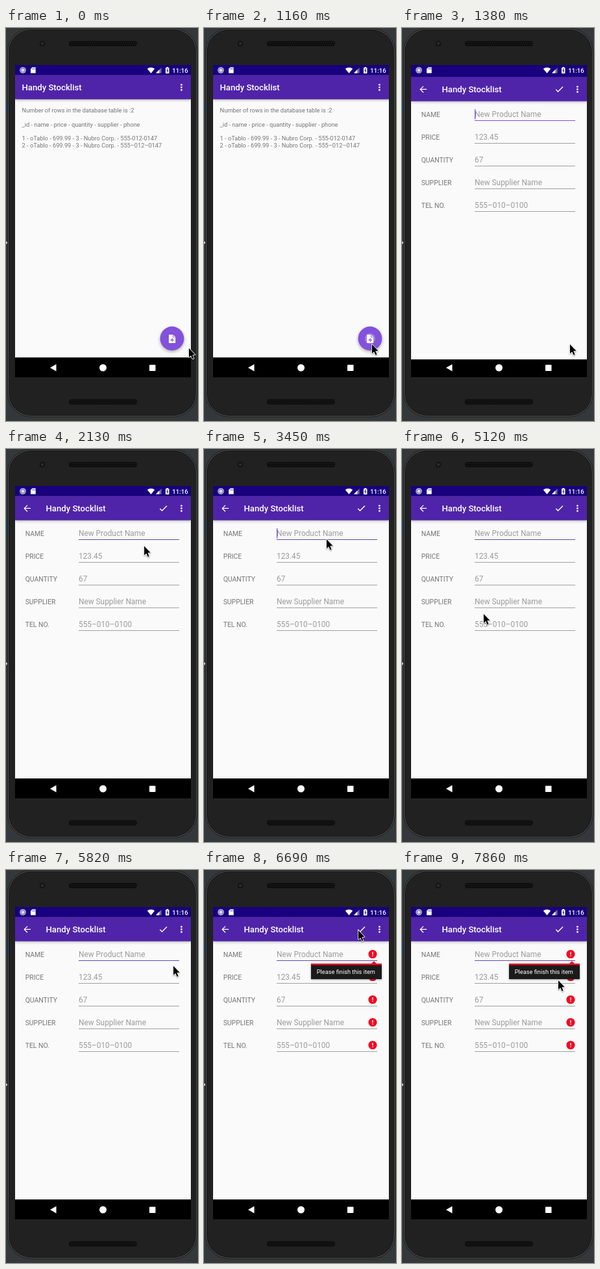
Write an HTML page with a canvas that moves like this. It is 296 px wide and 605 px high and loops after 8000 ms.

```html
<!DOCTYPE html>
<html lang="en">
<head>
<meta charset="utf-8">
<title>Inventory app</title>
<style>
html, body { margin: 0; width: 100%; height: 100%; overflow: hidden; background: #34383a; }
canvas { display: block; width: 296px; height: 605px; }
</style>
</head>
<body>
<canvas id="stage" width="296" height="605"></canvas>
<script>
const ctx = document.getElementById('stage').getContext('2d');
const LOOP = 8000;
const TITLE = 'Handy Stocklist';
const LIST = [
  'Number of rows in the database table is :2', '',
  '_id - name - price - quantity - supplier - phone', '',
  '1 - oTablo - 699.99 - 3 - Nubro Corp. - 555-012-0147',
  '2 - oTablo - 699.99 - 3 - Nubro Corp. - 555–012–0147'
];
const FIELDS = [
  ['NAME', 'New Product Name'], ['PRICE', '123.45'], ['QUANTITY', '67'],
  ['SUPPLIER', 'New Supplier Name'], ['TEL NO.', '555–010–0100']
];
const SCREEN = { x: 14, y: 57, w: 271, h: 481.8 };
const DP = SCREEN.w / 411.4;
const ROW = 35;
const STATUS = '#18007e', BAR = '#5024a9', ACCENT = '#8351db', RED = '#f20a22';
const OPEN_AT = 1235, CARET_AT = 1295, CARET_HALF = 481, ERROR_AT = 6570;

// Each gesture passes its points at even intervals and rests until the next one.
const GESTURES = [
  { from: 0, to: 690, via: [[282, 493], [262, 511], [217, 470], [238, 440], [259, 487]] },
  { from: 1640, to: 3450, via: [[259, 487], [243, 330], [217, 163], [196, 140], [178, 205],
    [150, 274], [165, 232], [182, 175], [189, 139]] },
  { from: 3660, to: 6180, via: [[189, 139], [64, 156], [141, 188], [90, 216], [124, 252],
    [160, 274], [258, 148], [238, 93]] },
  { from: 7060, to: 7860, via: [[238, 93], [254, 125], [240, 164], [241, 170]] }
];

const clamp = v => Math.max(0, Math.min(1, v));

function pointerAt(t) {
  const { from, to, via } = GESTURES.findLast(g => g.from <= t);
  const last = via.length - 1;
  const pos = clamp((t - from) / (to - from)) * last;
  const i = Math.min(Math.floor(pos), last - 1), u = pos - i;
  const slope = (n, k) => n > 0 && n < last ? (via[n + 1][k] - via[n - 1][k]) / 2 : 0;
  const ease = u * u * (3 - 2 * u);
  return [0, 1].map(k =>
    via[i][k] + (via[i + 1][k] - via[i][k]) * ease +
    u * (1 - u) * ((1 - u) * slope(i, k) - u * slope(i + 1, k)));
}

function rect(x, y, w, h, color) {
  ctx.fillStyle = color;
  ctx.fillRect(x, y, w, h);
}
function round(x, y, w, h, r, color) {
  ctx.fillStyle = color;
  ctx.beginPath();
  ctx.roundRect(x, y, w, h, r);
  ctx.fill();
}
function disc(x, y, r, color) {
  ctx.fillStyle = color;
  ctx.beginPath();
  ctx.arc(x, y, r, 0, Math.PI * 2);
  ctx.fill();
}
function trace(points, close) {
  ctx.beginPath();
  points.forEach(([x, y]) => ctx.lineTo(x, y));
  if (close) ctx.closePath();
}
function poly(points, color) {
  trace(points, true);
  ctx.fillStyle = color;
  ctx.fill();
}
function line(points, color, width) {
  trace(points);
  ctx.strokeStyle = color;
  ctx.lineWidth = width;
  ctx.stroke();
}
function text(str, x, y, size, color, weight = 400) {
  ctx.font = `${weight} ${size}px Roboto, sans-serif`;
  ctx.fillStyle = color;
  ctx.fillText(str, x, y);
}
function withShadow(alpha, blur, dy, paint) {
  ctx.save();
  ctx.shadowColor = `rgba(0,0,0,${alpha})`;
  ctx.shadowBlur = blur;
  ctx.shadowOffsetY = dy;
  paint();
  ctx.restore();
}

function speaker(y) {
  round(97, y, 105, 8, 4, '#0d0d0d');
  for (let x = 100; x < 200; x += 3) {
    rect(x, y + 2, 1, 1, '#333');
    rect(x + 1, y + 5, 1, 1, '#2b2b2b');
  }
}

function drawPhone() {
  rect(0, 0, 296, 605, '#34383a');
  rect(0, 112, 2, 19, '#173f5d');
  disc(0, 330.5, 2, '#d5d5d5');
  ['#1c1c1c', '#525353', '#171717', '#212121'].forEach((color, i) =>
    round(2 + i, i, 293 - 2 * i, 599 - 2 * i, 37 - i, color));
  disc(56, 24, 4.5, '#151515');
  disc(56, 24, 2, '#2d3036');
  speaker(20);
  speaker(571.5);
}

function drawWindow(titleX) {
  const { x, y, w, h } = SCREEN;
  const barTop = y + 24 * DP, barBottom = barTop + 56 * DP;
  rect(x, y, w, h, '#fafafa');
  withShadow(0.3, 4, 1.2, () => rect(x, barTop, w, barBottom - barTop, BAR));
  rect(x, y, w, 24 * DP, STATUS);
  rect(x, y + h - 48 * DP, w, 100, '#000');
  text(TITLE, titleX, 96.3, 20 * DP, '#fff', 500);
  for (let i = -1; i <= 1; i++) disc(270.5, 91.4 + i * 4, 1.35, '#fff');
}

function drawList(t) {
  drawWindow(24.5);
  LIST.forEach((s, i) => text(s, 24.6, 130.2 + i * 10.75, 14 * DP, '#757575'));
  withShadow(0.32, 5, 2, () => disc(256, 478, 28 * DP, ACCENT));
  disc(256, 478, 28 * DP * clamp((t - 1080) / 180), 'rgba(255,255,255,.22)');
  poly([[251, 472], [257.4, 472], [261.2, 475.6], [261.2, 485], [251, 485]], '#fff');
  line([[257.4, 472.5], [257.4, 476], [260.7, 476]], ACCENT, 0.9);
  line([[256.2, 477.6], [256.2, 483]], ACCENT, 1.3);
  line([[253.5, 480.3], [258.9, 480.3]], ACCENT, 1.3);
}

function drawError(y) {
  disc(260, y, 6.6, RED);
  rect(259.3, y - 3.4, 1.4, 4.2, '#fff');
  rect(259.3, y + 2, 1.4, 1.4, '#fff');
}

function drawPopup() {
  withShadow(0.35, 3, 1, () => rect(165, 145, 109, 23, '#1b1b1b'));
  rect(165, 144, 109, 2.4, RED);
  poly([[257.5, 144.5], [262, 140.3], [266.5, 144.5]], RED);
  text('Please finish this item', 173.8, 160.4, 14 * DP, '#fff');
}

function drawForm(t) {
  drawWindow(61.5);
  line([[38, 91.4], [28.3, 91.4]], '#fff', 1.3);
  line([[33, 86.6], [28.2, 91.4], [33, 96.2]], '#fff', 1.3);
  line([[237.3, 91.8], [240.5, 95], [248, 87.5]], '#fff', 1.4);
  FIELDS.forEach(([label, hint], i) => {
    const y = i * ROW;
    text(label, 29.7, 134.2 + y, 10.4, '#757575');
    text(hint, 112, 134.2 + y, 18 * DP, '#9b9b9b');
    rect(112, 139 + y, 155, 1, i ? '#a0a0a0' : t < 1500 ? ACCENT : '#62509d');
  });
  if (t >= CARET_AT && Math.floor((t - CARET_AT) / CARET_HALF) % 2 === 0)
    rect(112, 122, 1.3, 15.5, ACCENT);

  const tap = (t - 6500) / 190;
  if (tap > 0 && tap < 1) disc(242.5, 91.5, 4 + 5.5 * tap, `rgba(255,255,255,${0.25 * (1 - tap)})`);
  if (t < ERROR_AT) return;
  FIELDS.forEach((_, i) => drawError(129.5 + i * ROW));
  drawPopup();
}

function drawSystemIcons() {
  disc(26, 65, 4.8, '#c9c6e2');
  disc(26, 65, 3.6, '#6b63a0');
  disc(26, 65, 2.5, '#dcdaec');
  poly([[38, 63], [40.5, 60.5], [45.7, 60.5], [45.7, 69.5], [38, 69.5]], '#fff');
  for (let x = 40.6; x < 45; x += 1.7) rect(x, 62, 0.7, 1.8, STATUS);
  ctx.fillStyle = '#fff';
  ctx.beginPath();
  ctx.moveTo(223.5, 69.7);
  ctx.arc(223.5, 69.7, 9, -Math.PI * 0.72, -Math.PI * 0.28);
  ctx.fill();
  const signal = size => [[231, 69.5], [231 + size, 69.5], [231 + size, 69.5 - size]];
  poly(signal(8.6), '#746aac');
  poly(signal(5.4), '#fff');
  round(246, 61, 5.5, 9, 0.8, '#fff');
  rect(247.6, 60, 2.3, 1.2, '#fff');
  line([[249.4, 62.3], [247.9, 65.5], [249.7, 65.5], [248.2, 68.7]], STATUS, 1);
  text('11:16', 256.3, 68.6, 9.6, '#fff', 500);
  poly([[68, 523], [77.5, 517.5], [77.5, 528.5]], '#fff');
  disc(149.5, 523, 5.5, '#fff');
  round(221, 518.5, 9.5, 9.5, 0.8, '#fff');
}

function drawPointer([x, y]) {
  const arrow = [[0, 0], [0, 14], [3.2, 11.2], [5.7, 16.5], [7.6, 15.7], [5.4, 10.2], [9.6, 10]];
  ctx.save();
  ctx.translate(x, y);
  ctx.lineJoin = 'round';
  withShadow(0.4, 2, 1, () => {
    trace(arrow, true);
    ctx.lineWidth = 1.6;
    ctx.strokeStyle = '#fff';
    ctx.stroke();
  });
  poly(arrow, '#000');
  ctx.restore();
}

function draw(t) {
  drawPhone();
  ctx.save();
  ctx.beginPath();
  ctx.rect(SCREEN.x, SCREEN.y, SCREEN.w, SCREEN.h);
  ctx.clip();
  if (t < OPEN_AT + 200) drawList(t);
  if (t >= OPEN_AT) {
    // The new screen slides up while it fades in.
    const left = 1 - clamp((t - OPEN_AT) / 350);
    ctx.globalAlpha = 1 - (1 - clamp((t - OPEN_AT) / 160)) ** 4;
    ctx.translate(0, Math.round(0.08 * SCREEN.h * left ** 5));
    drawForm(t);
  }
  ctx.restore();
  drawSystemIcons();
  drawPointer(pointerAt(t));
}

const start = performance.now();
function tick() {
  draw((performance.now() - start) % LOOP);
  requestAnimationFrame(tick);
}
tick();
</script>
</body>
</html>
```
